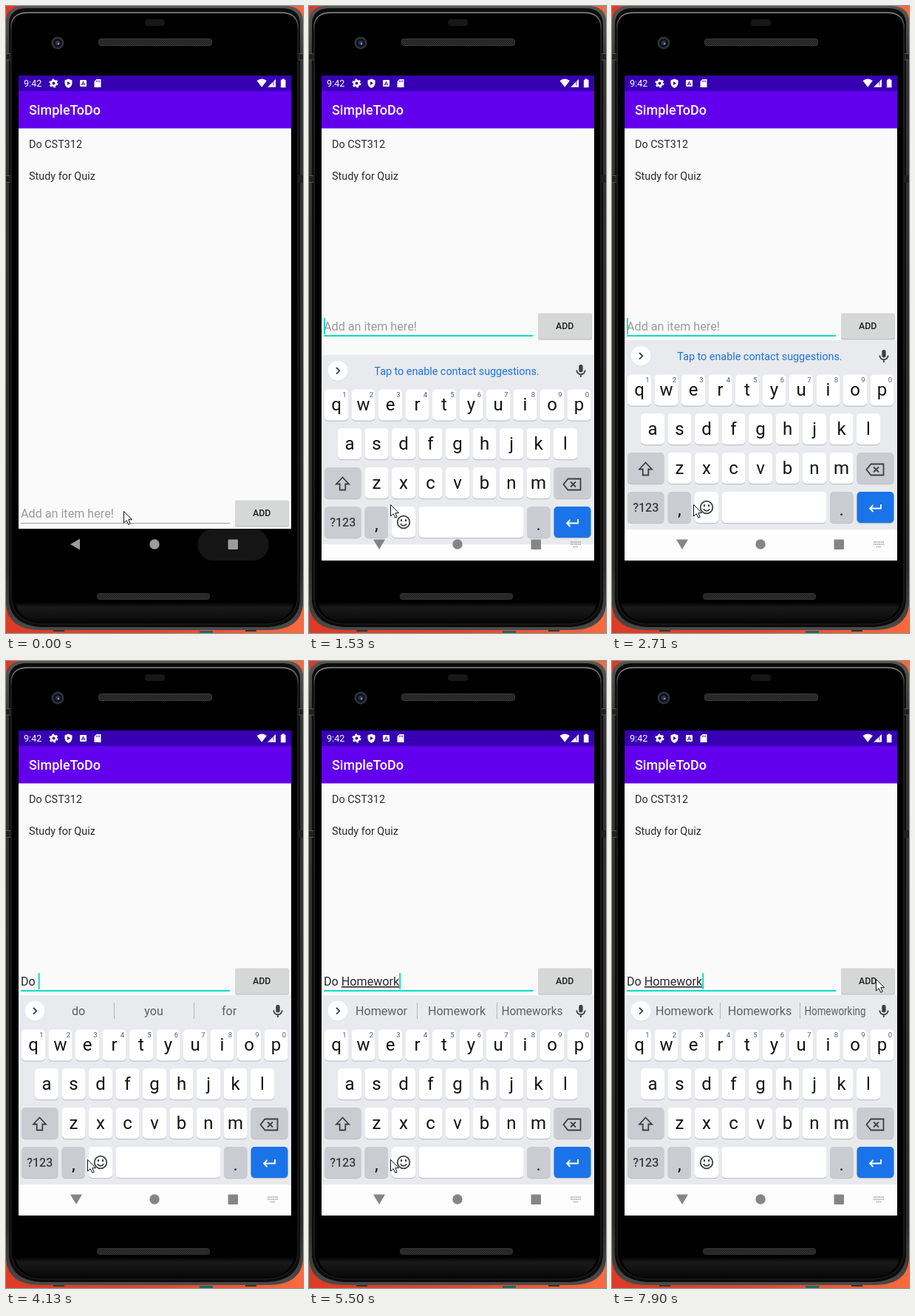
Write an HTML page that moves like this. It is 402 by 848 pixels and loops after 8 s.

```html
<!DOCTYPE html>
<html lang="en">
<head>
<meta charset="utf-8">
<title>To-do app demo</title>
<style>
html, body { margin: 0; width: 100%; height: 100%; overflow: hidden; background: #ee4a30; }
svg { display: block; width: 402px; height: 848px; font-family: Roboto, sans-serif; }
text { white-space: pre; }
.mid { text-anchor: middle; }
.med { font-weight: 500; }
.line { fill: none; stroke: #3c4043; stroke-width: 1.8; }
.compose { text-decoration: underline; text-decoration-thickness: 1px; text-underline-offset: 2px; }
</style>
</head>
<body>
<svg viewBox="0 0 402 848">
  <defs>
    <linearGradient id="wall"><stop stop-color="#dd3b25"/><stop offset=".5" stop-color="#e0452c"/><stop offset="1" stop-color="#fb6a3e"/></linearGradient>
    <linearGradient id="rim" x2="0" y2="1"><stop stop-color="#565856"/><stop offset=".1" stop-color="#343534"/><stop offset=".9" stop-color="#2c2d2c"/><stop offset="1" stop-color="#4a4b4a"/></linearGradient>
    <linearGradient id="chin" x2="0" y2="1"><stop stop-color="#000"/><stop offset=".25" stop-color="#191919"/><stop offset=".6" stop-color="#121212"/><stop offset="1" stop-color="#050505"/></linearGradient>
    <linearGradient id="shine" x2="0" y2="1"><stop stop-color="#8b8f8b"/><stop offset=".03" stop-color="#262626"/><stop offset="1" stop-color="#1c1c1c"/></linearGradient>
    <pattern id="mesh" width="3" height="3" patternUnits="userSpaceOnUse"><rect width="3" height="3" fill="#303030"/><path d="M0 3L3 0" stroke="#191919"/></pattern>
    <clipPath id="screen"><rect x="17" y="94" width="369" height="656"/></clipPath>
  </defs>

  <rect width="402" height="848" fill="url(#wall)"/>
  <path d="M64 842h15v4h-15zM324 842h15v4h-15z" fill="#333"/>
  <path d="M262 845h18v3h-18z" fill="#23665f"/>
  <path d="M0 18Q2 1 22 0H380Q400 1 402 18V810Q399 843 357 844H45Q3 843 0 810Z" fill="url(#rim)"/>
  <path d="M4 22Q6 4 26 3H376Q396 4 398 22V806Q394 838 354 840H48Q8 838 4 806Z" fill="#0c0c0c"/>
  <path d="M7 26Q9 9 30 9H372Q393 9 395 26V802Q391 834 352 836H50Q11 834 7 802Z" stroke="url(#shine)" stroke-width="1.5"/>
  <path d="M12 806H390Q384 832 352 835H50Q18 832 12 806Z" fill="url(#chin)"/>
  <path d="M0 64h6v9H0zM396 64h6v9h-6zM0 229h6v10H0zM396 229h6v10h-6z" fill="#202120"/>
  <path d="M0 64.5h6M0 73h6M396 64.5h6M396 73h6M0 229.5h6M0 238.5h6" stroke="#555"/>
  <rect x="188" y="18" width="27" height="9" rx="4" fill="#171717"/>
  <rect x="125.500" y="44.500" width="153" height="9" rx="3" fill="url(#mesh)" stroke="#3b3b3b"/>
  <rect x="123.500" y="794.500" width="152" height="8" rx="3" fill="url(#mesh)" stroke="#333"/>
  <circle cx="70" cy="50" r="8.500" fill="#333"/>
  <circle cx="70" cy="50" r="6" fill="#11131c"/>
  <circle cx="70" cy="50" r="3" fill="#26365f"/>
  <circle cx="71" cy="51" r="1.200" fill="#8298c8"/>

  <rect x="17" y="94" width="369" height="613" fill="#fafafa"/>
  <rect x="17" y="115" width="369" height="50.500" fill="#6200ee"/>
  <rect x="17" y="94" width="369" height="21" fill="#3700b3"/>
  <g fill="#fff">
    <text x="24" y="109" font-size="12.600">9:42</text>
    <circle cx="64.500" cy="104.500" r="3.300" fill="none" stroke="#fff" stroke-width="2.800"/>
    <circle cx="64.500" cy="104.500" r="5.200" fill="none" stroke="#fff" stroke-width="1.800" stroke-dasharray="2.700 2.745"/>
    <path d="M84.500 98.500l5 2v3.800q0 4.400-5 6.700q-5-2.300-5-6.700v-3.800z"/>
    <path d="M83 102l4 2.500-4 2.500z" fill="#3700b3"/>
    <rect x="100" y="100" width="9" height="9" rx="1.200"/>
    <path d="M102.200 107.300l2.300-5.300 2.300 5.300M103 105.700h3" fill="none" stroke="#3700b3"/>
    <path d="M122.500 99h6v11h-9v-8z"/>
    <path d="M122.500 100.500v2.500M124.500 100.500v2.500M126.500 100.500v2.500" stroke="#3700b3" stroke-width=".8"/>
    <path d="M339.500 101q6.700-5 13.400 0L346.200 109.800z"/>
    <path d="M365 99v10.800h-10.800z"/>
    <path d="M362 102v5.500" stroke="#3700b3" stroke-width=".8"/>
    <path d="M373.700 98.500h3v1.200h1.800v10.500h-6.600V99.700h1.800z"/>
    <text class="med" x="31" y="147" font-size="18">SimpleToDo</text>
  </g>
  <g font-size="14.400" fill="#2a2a2a">
    <text x="31" y="192">Do CST312</text>
    <text x="31" y="235">Study for Quiz</text>
  </g>

  <g id="entry">
    <text id="hint" x="20" y="692" font-size="16.150" fill="#9b9b9b">Add an item here!</text>
    <text id="typed" x="20" y="692" font-size="16.150" fill="#2a2a2a"></text>
    <rect id="rule" x="20" width="283"/>
    <rect id="caret" y="675" width="1.800" height="22" fill="#03dac5"/>
    <rect x="310" y="669" width="73" height="35.500" rx="2" fill="#c2c3c3"/>
    <rect x="310" y="668.500" width="72.500" height="34.500" rx="2" fill="#d6d7d7"/>
    <text class="mid med" x="346.200" y="690" font-size="12.400" fill="#202020">ADD</text>
  </g>

  <g clip-path="url(#screen)">
    <rect x="17" y="707" width="369" height="43"/>
    <g id="keyboard">
      <rect x="17" y="452" width="369" height="256" fill="#e8eaed"/>
      <rect x="17" y="708" width="369" height="42" fill="#fdfdfd"/>
      <circle cx="39" cy="474" r="13.500" fill="#d3d5d8"/>
      <circle cx="39" cy="473.300" r="13.500" fill="#fff"/>
      <path class="line" d="M37 469l4.300 4.300-4.300 4.300"/>
      <rect x="365.300" y="465" width="5.400" height="10.500" rx="2.700" fill="#3c4043"/>
      <path class="line" d="M362.300 472.500a5.700 5.700 0 0 0 11.400 0M368 478v4"/>
      <text id="tip" class="mid" x="200" y="479" font-size="14.350" fill="#1a73e8">Tap to enable contact suggestions.</text>
      <g id="strip" class="mid" font-size="16.100" fill="#5c6064">
        <path d="M146.500 462v22M254.500 462v22" stroke="#b4b7bb"/>
      </g>
      <g id="keys"></g>
      <path class="line" d="M45.500 617.500l8.500 9h-4.700v8h-7.600v-8H37z"/>
      <path class="line" d="M350.500 619.500h17v15h-17l-6-7.500z"/>
      <path class="line" d="M354 623.500l7 7m0-7l-7 7"/>
      <circle class="line" cx="128" cy="678" r="8.300"/>
      <path class="line" d="M123.800 680.300q4.200 5 8.400 0"/>
      <path d="M125 674.300v2.600M131 674.300v2.600" stroke="#3c4043" stroke-width="2.200"/>
      <path class="line" d="M364 674v5.500h-15m4.500-4.500l-4.500 4.500 4.500 4.500" style="stroke:#fff"/>
    </g>
    <rect id="ripple" x="259.500" y="707" width="96" height="43" rx="21" fill="#151515"/>
    <g id="buttons">
      <path id="back"/>
      <circle cx="201" cy="728" r="6.700"/>
      <rect x="300.500" y="721.500" width="13.500" height="13.500" rx="1"/>
      <path id="ime" d="M354 725h14M354 728h14M357.500 731.500h7" fill="none" stroke-width="1.700" stroke-dasharray="1.700 .75"/>
    </g>
  </g>
  <path id="pointer" d="M.5.500V16L4.200 12.700 6.800 18.300 9.200 17.200 6.800 11.700H11.500Z" fill="#fff" stroke="#111"/>
</svg>
<script>
const LOOP = 8000;
const $ = id => document.getElementById(id);
const set = (el, attrs) => { for (const k in attrs) el.setAttribute(k, attrs[k]); return el; };
const add = (parent, tag, attrs, text = '') => {
  const el = set(document.createElementNS('http://www.w3.org/2000/svg', tag), attrs);
  el.textContent = text;
  return parent.appendChild(el);
};
const show = (el, on) => { el.style.visibility = on ? 'visible' : 'hidden'; };

// Value of the last step at or before t.
const at = (steps, t) => steps.filter(s => s[0] <= t).pop()[1];

// Keyboard
const PITCH = 36.5, GREY = '#caccd2';
function key(x, y, w, label = '', { fill = '#fff', size = 24, base = 28.5, sup = '' } = {}) {
  const keys = $('keys');
  add(keys, 'rect', { x, y: y + 1.2, width: w, height: 42, rx: 5, fill: '#bfc2c6' });
  add(keys, 'rect', { x, y, width: w, height: 42, rx: 5, fill });
  const small = size < 20;
  add(keys, 'text', {
    class: small ? 'mid med' : 'mid', x: x + w / 2, y: y + base,
    'font-size': size, fill: small ? '#3c4043' : '#111'
  }, label);
  if (sup) add(keys, 'text', { class: 'mid', x: x + 27, y: y + 10, 'font-size': 9.5, fill: '#55595e' }, sup);
}
const row = (letters, x, y, sups = '') =>
  [...letters].forEach((c, i) => key(x + i * PITCH, y, 32, c, { sup: sups[i] }));
row('qwertyuiop', 21, 498.5, '1234567890');
row('asdfghjkl', 39, 551);
key(21, 604, 49.5, '', { fill: GREY });
row('zxcvbnm', 75.5, 604);
key(331.5, 604, 50, '', { fill: GREY });
key(21, 657, 49.5, '?123', { fill: GREY, size: 16, base: 27 });
key(75.5, 657, 31.5, ',', { fill: GREY, base: 32 });
key(112, 657, 32);
key(148.5, 657, 142);
key(295, 657, 31.5, '.', { fill: GREY, base: 32 });
key(331.5, 657, 50, '', { fill: '#1a73e8' });

// The last suggestion is condensed when wider than its slot, as the keyboard does.
const SLOT = 83;
const words = [98, 200, 302].map(x => ({ x, el: add($('strip'), 'text', { y: 479 }) }));
function suggest(list, visible) {
  show($('tip'), !list && visible);
  show($('strip'), list && visible);
  if (!list) return;
  list.split(' ').forEach((word, i) => {
    const { x, el } = words[i];
    el.textContent = word;
    const scale = i === 2 ? Math.min(1, SLOT / el.getComputedTextLength()) : 1;
    set(el, { transform: `translate(${x} 0) scale(${scale} 1)` });
  });
}

function type(text) {
  const el = $('typed'), cut = text.lastIndexOf(' ') + 1;
  el.textContent = '';
  add(el, 'tspan', {}, text.slice(0, cut));
  add(el, 'tspan', { class: 'compose' }, text.slice(cut));
  set($('caret'), { x: 20 + (text ? el.getComputedTextLength() : 0) });
  show($('hint'), !text);
}

// Timeline
const POINTER = [
  [0, [159, 683]], [160, null], [560, [110, 675]], [720, [110, 674]],
  [6200, [84, 668]], [6340, [56, 640]], [6480, [104, 590]], [6620, [182, 540]],
  [6760, [238, 498]], [6900, [297, 434]], [7060, [316, 422]], [7210, [327, 414]],
  [7360, [346, 405]], [7500, [361, 412]], [7640, [362, 424]], [7780, [358, 430]], [7900, [357, 430]]
];
const TYPED = [
  [0, ''], [3560, 'D'], [3700, 'Do'], [4130, 'Do '], [4400, 'Do H'], [4540, 'Do Ho'],
  [4670, 'Do Hom'], [4810, 'Do Home'], [4940, 'Do Homew'], [5080, 'Do Homewo'],
  [5360, 'Do Homewor'], [5500, 'Do Homework']
];
const STRIP = [
  [0, ''], [4130, 'do you for'], [4270, 'you not the'], [4540, 'He Have How'],
  [4670, 'Ho How Home'], [4810, 'Hom Home Homework'], [4940, 'Home Homework Homes'],
  [5080, 'Homew Homework Homeworks'], [5220, 'Homewo Homework Homeworks'],
  [5500, 'Homewor Homework Homeworks'], [5640, 'Homework Homeworks Homeworking']
];
const CARET = [
  [0, 0], [1530, 1], [2120, 0], [2710, 1], [3120, 0], [3560, 1],
  [6200, 0], [6760, 1], [7360, 0], [7780, 1]
];
const RULE = [[0, ['#9a9a9a', 1]], [720, ['#3db0a5', 1.5]], [1530, ['#03dac5', 2]]];
const RIPPLE = [[0, 1], [990, .6], [1130, .3], [1250, 0]];
const SLIDE = [[0, 0], [1530, 20], [1690, 1.5], [1840, 0]];

function draw(t) {
  const open = t >= 1530, imeOpen = t >= 1130;

  set($('entry'), { transform: `translate(0 ${open ? -253 : 0})` });
  show($('keyboard'), open);
  set($('keyboard'), { transform: `translate(0 ${at(SLIDE, t)})` });

  set($('buttons'), { fill: open ? '#858585' : '#9c9c9c' });
  set($('back'), { d: imeOpen ? 'M87 721.500h16l-8 13.500z' : 'M87 728l13-7.500v15z' });
  set($('ime'), { stroke: open ? '#a3a3a3' : '#8a8a8a' });
  show($('ime'), imeOpen);
  set($('ripple'), { opacity: at(RIPPLE, t) });

  const [fill, height] = at(RULE, t);
  set($('rule'), { fill, height, y: 700 - height });
  type(at(TYPED, t));
  show($('caret'), at(CARET, t));
  suggest(at(STRIP, t), open);

  const spot = at(POINTER, t);
  show($('pointer'), spot);
  if (spot) set($('pointer'), { transform: `translate(${spot})` });
}

const start = performance.now();
function tick() {
  draw((performance.now() - start) % LOOP);
  requestAnimationFrame(tick);
}
tick();
</script>
</body>
</html>
```
